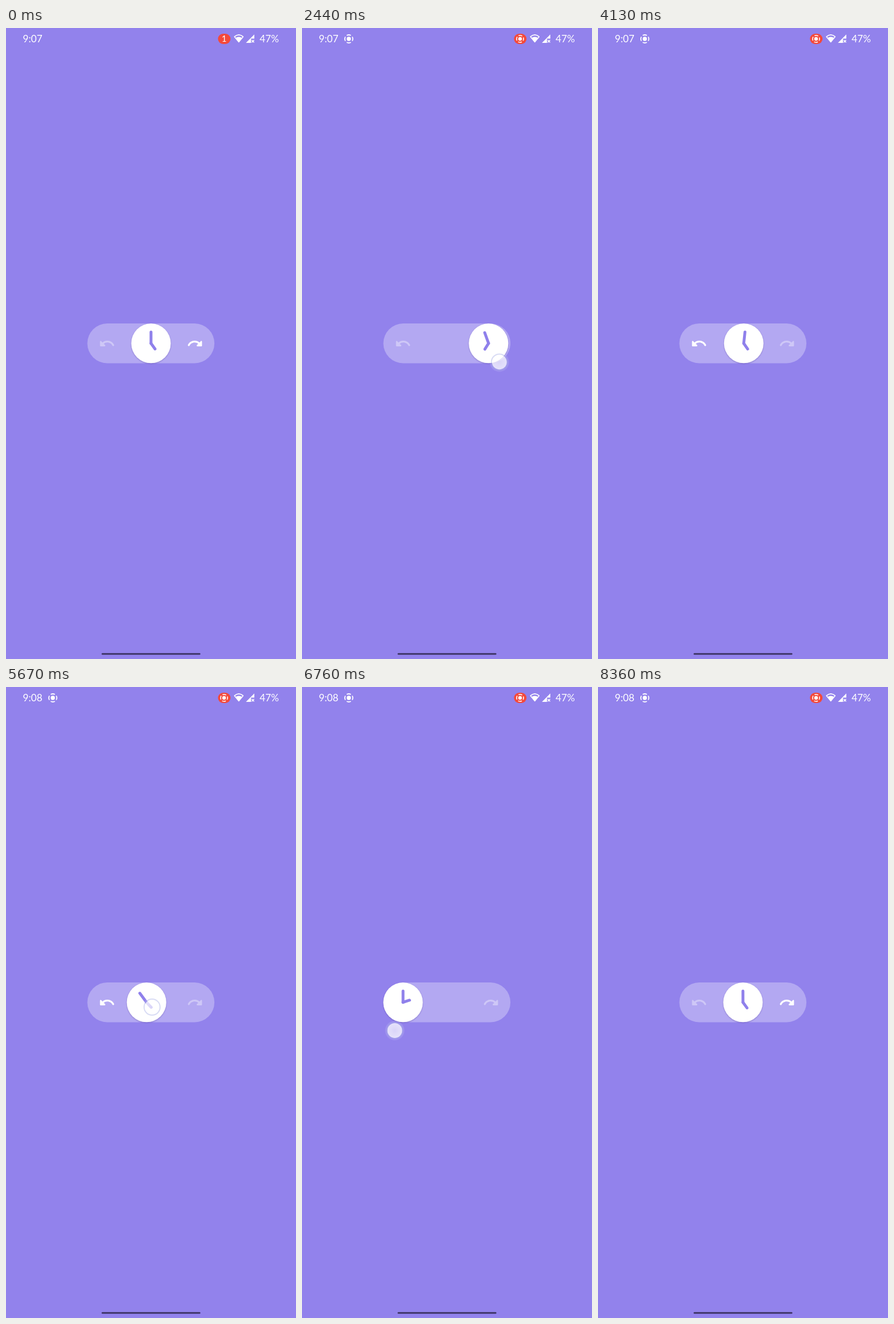
Recreate the animation shown at these times as an HTML page. Size 508 px wide and 1102 px high, loop 8.56 s.

```html
<!DOCTYPE html>
<html lang="en">
<head>
<meta charset="utf-8">
<title>Undo / redo slider</title>
<style>
  html, body { margin: 0; width: 100%; height: 100%; overflow: hidden; background: #9282ec; }
  svg { display: block; width: 100vw; height: 100vh; }
  text { font-family: Lato, "Open Sans", sans-serif; font-size: 17.2px; fill: #fff; }
  #knob { filter: drop-shadow(0 1px 1px rgba(50, 30, 120, .3)); }
  .hand { stroke: #8f80eb; stroke-width: 5; stroke-linecap: round; }
</style>
</head>
<body>
<svg viewBox="0 0 508 1102">
  <defs>
    <radialGradient id="tap">
      <stop offset="0" stop-color="#fff" stop-opacity=".62"/>
      <stop offset="1" stop-color="#fff" stop-opacity=".74"/>
    </radialGradient>
    <g id="record">
      <circle r="3.7" fill="#fff"/>
      <circle r="7" fill="none" stroke="#fff" stroke-width="1.8" pathLength="40"
              stroke-dasharray="7 3" stroke-dashoffset="3.5"/>
    </g>
    <path id="arrow" fill="#fff" d="M12.5 8c-2.65 0-5.05.99-6.9 2.6L3.71 8.71C3.08 8.08 2 8.52 2 9.41V15c0 .55.45 1 1 1h5.59c.89 0 1.34-1.08.71-1.71l-1.91-1.91c1.39-1.16 3.16-1.88 5.12-1.88 3.16 0 5.89 1.84 7.19 4.5.27.56.91.84 1.5.64.71-.23 1.07-1.04.75-1.72C20.23 10.42 16.65 8 12.5 8z"/>
  </defs>

  <!-- status bar -->
  <text id="time" x="29.5" y="25.4">9:07</text>
  <use id="notice" href="#record" transform="translate(82 19)"/>
  <rect x="371.3" y="10" width="22" height="18" rx="9" fill="#f4493b"/>
  <text id="count" x="382" y="24.3" text-anchor="middle" style="font-size:15px">1</text>
  <use id="badge" href="#record" transform="translate(382 19) scale(.87)"/>
  <path d="M400.2 15.2Q407.8 8.6 415.4 15.2L407.8 24.4Z" fill="none" stroke="#fff"
        stroke-width="1.6" stroke-linejoin="round"/>
  <path d="M402 17.3Q407.8 13.8 413.6 17.3L407.8 24.6Z" fill="#fff"/>
  <path d="M420.3 26L435 11.3V18.6H429.2V26Z" fill="#fff"/>
  <path d="M430.4 21L434.6 25.2M434.6 21L430.4 25.2" stroke="#fff" stroke-width="1.6"/>
  <text x="444.2" y="25.4">47%</text>

  <!-- slider -->
  <rect x="142.5" y="516" width="222.6" height="69.4" rx="34.7" fill="#fff" fill-opacity=".3"/>
  <use id="undo" href="#arrow" transform="translate(177 551) scale(1.235) translate(-12 -12)"/>
  <use id="redo" href="#arrow" transform="translate(331 551) scale(-1.235 1.235) translate(-12 -12)"/>
  <g id="knob">
    <circle r="34.6" fill="#fff"/>
    <line id="minute" class="hand" y2="-19.8"/>
    <line id="hour" class="hand" y2="-12"/>
  </g>

  <g id="touch">
    <circle r="17" fill="#fff" fill-opacity=".1"/>
    <circle r="13" fill="url(#tap)"/>
    <circle r="14" fill="none" stroke="#a5abe4" stroke-opacity=".42" stroke-width="2"/>
  </g>

  <rect x="167.5" y="1091.7" width="173" height="2.9" rx="1.4" fill="#3a3160"/>
</svg>
<script>
  const LOOP = 8560, MID = 254, TRAVEL = 77, DIM = .36;
  const $ = id => document.getElementById(id);
  const clamp = (v, lo, hi) => Math.min(hi, Math.max(lo, v));
  const ramp = (t, from, to) => clamp((t - from) / (to - from), 0, 1);

  // Finger paths: [ms, x, y]; grab is the finger's offset from the knob.
  const drags = [
    { dir: 1, grab: 19, release: 3545, path: [
      [650, 271.8, 550.3], [1840, 271.8, 550.3], [1880, 273, 551], [2300, 331, 575],
      [2720, 375, 600], [3130, 401, 604], [3380, 405, 602]] },
    { dir: -1, grab: 9.7, release: 7285, path: [
      [4830, 265, 556.5], [5630, 265, 556.5], [5670, 256, 559], [6100, 206, 579],
      [6520, 164.5, 599], [6760, 162.5, 600]] }
  ];

  function follow(path, t) {
    let i = 1;
    while (i < path.length - 1 && t > path[i][0]) i++;
    const [a, b] = [path[i - 1], path[i]], k = ramp(t, a[0], b[0]);
    return [a[1] + (b[1] - a[1]) * k, a[2] + (b[2] - a[2]) * k];
  }

  // Underdamped spring, from 1 to rest at 0.
  function spring(ms) {
    const s = ms / 1000, w = Math.sqrt(200), zeta = .5;
    const wd = w * Math.sqrt(1 - zeta * zeta);
    return Math.exp(-zeta * w * s) * (Math.cos(wd * s) + zeta * w / wd * Math.sin(wd * s));
  }

  function draw(t) {
    let offset = 0, finger = null;
    for (const { dir, grab, release, path } of drags) {
      if (t < path[0][0]) continue;
      if (t < release) {
        finger = follow(path, t);
        offset = dir * clamp(dir * (finger[0] - grab - MID) / TRAVEL, 0, 1);
      } else {
        offset = dir * spring(t - release);
      }
    }
    $('knob').setAttribute('transform', `translate(${MID + TRAVEL * offset} 550.7)`);
    $('minute').setAttribute('transform', `rotate(${360 * offset})`);
    $('hour').setAttribute('transform', `rotate(${144 + 72 * offset})`);

    $('touch').style.display = finger ? '' : 'none';
    if (finger) $('touch').setAttribute('transform', `translate(${finger})`);

    const [first, second] = drags.map(d => ramp(t, d.release, d.release + 200));
    const undone = first - second;
    $('undo').style.opacity = DIM + (1 - DIM) * undone;
    $('redo').style.opacity = 1 - (1 - DIM) * undone;

    $('time').textContent = t < 4780 ? '9:07' : '9:08';
    $('count').style.opacity = 1 - ramp(t, 40, 200);
    $('badge').style.opacity = ramp(t, 100, 300);
    $('notice').style.opacity = ramp(t, 150, 400);
  }

  const start = performance.now();
  function tick() {
    draw((performance.now() - start) % LOOP);
    requestAnimationFrame(tick);
  }
  tick();
</script>
</body>
</html>
```
